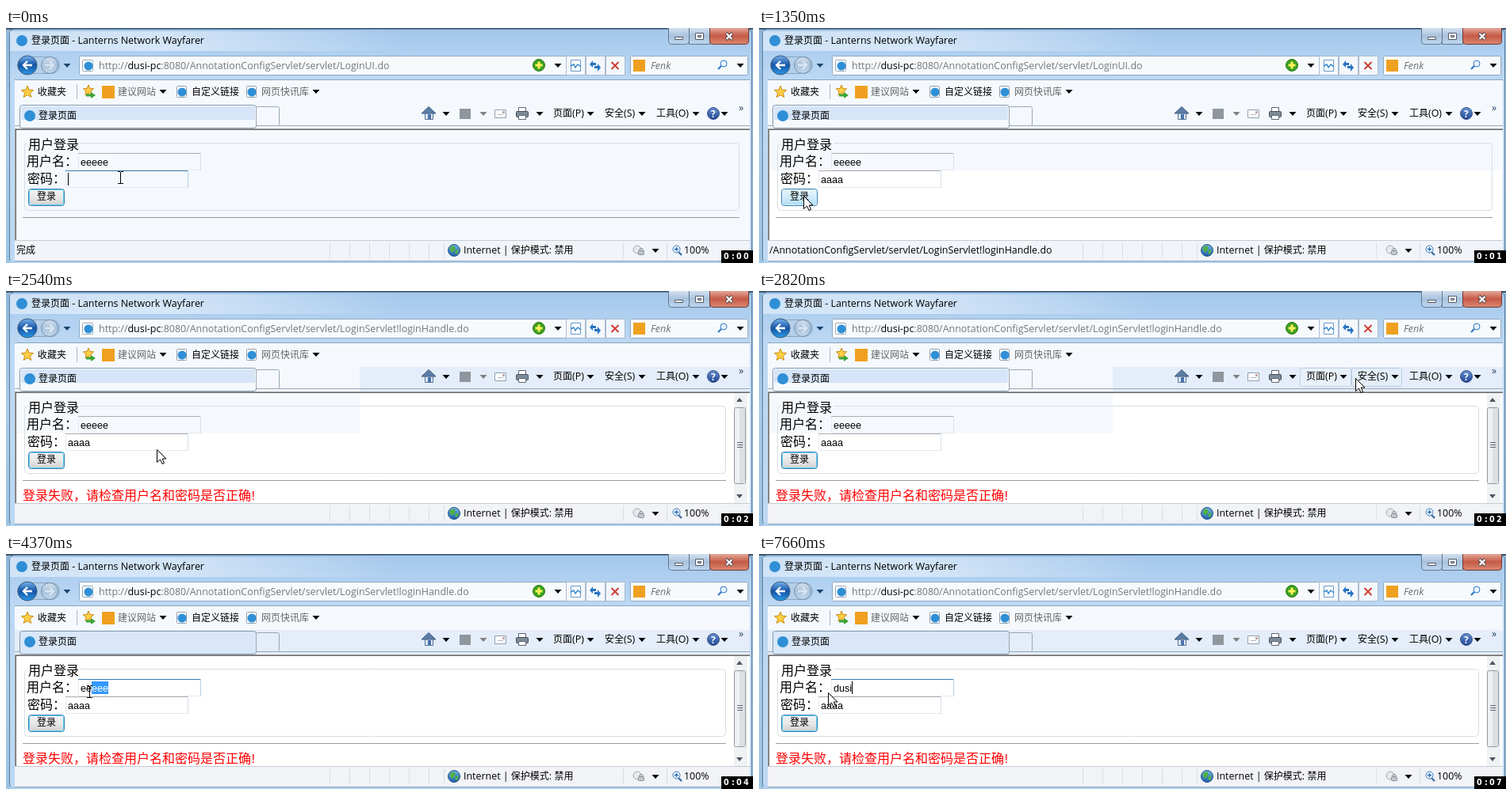
Recreate the animation shown at these times as an HTML page with a canvas. Size 942 by 297 pixels, loop 8000 ms.

```html
<!DOCTYPE html>
<html lang="zh">
<head>
<meta charset="utf-8">
<title>登录页面</title>
<style>
html, body { margin: 0; width: 100%; height: 100%; overflow: hidden; }
canvas { display: block; width: 942px; height: 297px; }
</style>
</head>
<body>
<canvas id="stage" width="942" height="297"></canvas>
<script>
const g = document.getElementById('stage').getContext('2d');
const LOOP = 8000;
const UI = '"Open Sans", "Noto Sans CJK SC", "Noto Sans CJK", sans-serif';
const CJK = '"Noto Sans CJK SC", "Noto Sans CJK", sans-serif';
const FIELD = '12.6px "Liberation Sans", sans-serif';
const TINT = '#f5f9fd';

// Step tracks: [start time, value...]
const pointer = [
  [0, 144, 189, 'beam'], [120, 0, 0, ''], [830, 128, 194, 'beam'], [960, 82, 204, 'beam'],
  [1080, 59, 210, 'arrow'], [1330, 56, 212, 'arrow'], [1480, 54, 213, 'arrow'],
  [2420, 190, 200, 'arrow'], [2550, 420, 160, 'arrow'], [2680, 690, 114, 'arrow'],
  [2820, 752, 110, 'arrow'], [2960, 735, 112, 'arrow'], [3080, 600, 118, 'arrow'],
  [3200, 390, 126, 'arrow'], [3330, 215, 130, 'arrow'], [3450, 140, 140, 'arrow'],
  [3580, 118, 157, 'arrow'], [3730, 134, 168, 'beam'], [3980, 129, 170, 'beam'],
  [4110, 118, 172, 'beam'], [4240, 105, 174, 'beam'], [4380, 92, 175, 'beam'],
  [4510, 82, 175, 'beam'], [4670, 87, 175, 'arrow']
];
const userName = [[0, 'eeeee'], [5350, 'd'], [5590, 'ds'], [6240, 'dsi'],
  [6670, 'd'], [6800, 'du'], [6960, 'dus'], [7660, 'dusi']];
const secret = [[0, ''], [120, 'a'], [270, 'aa'], [410, 'aaa'], [560, 'aaaa']];
const progress = [[0, 0], [1480, .1], [1630, .3], [1780, .56], [1930, .8], [2040, 1], [2150, 0]];
const selected = [[0, 0], [3980, 1], [4110, 2], [4240, 3], [4380, 5], [5350, 0]];
const seconds = [[0, 0], [1080, 1], [2040, 2], [3080, 3], [4110, 4], [5070, 5], [6140, 6], [7130, 7]];
const status = [[0, '完成'], [1080, '/AnnotationConfigServlet/servlet/LoginServlet!loginHandle.do'],
  [1480, '完成'], [2420, '']];

const at = (track, t) => track.reduce((cur, k) => (t >= k[0] ? k : cur));
const within = (t, a, b) => t >= a && t < b;

function rect(x, y, w, h, fill) { g.fillStyle = fill; g.fillRect(x, y, w, h); }
function vgrad(y0, y1, ...cols) {
  const gr = g.createLinearGradient(0, y0, 0, y1);
  cols.forEach((c, i) => gr.addColorStop(i / (cols.length - 1), c));
  return gr;
}
function box(x, y, w, h, r, fill, stroke) {
  g.beginPath();
  g.roundRect(x + .5, y + .5, w - 1, h - 1, r);
  if (fill) { g.fillStyle = fill; g.fill(); }
  if (stroke) { g.strokeStyle = stroke; g.lineWidth = 1; g.stroke(); }
}
function disc(x, y, r, fill, stroke) {
  g.beginPath();
  g.arc(x, y, r, 0, 7);
  g.fillStyle = fill; g.fill();
  if (stroke) { g.strokeStyle = stroke; g.lineWidth = 1; g.stroke(); }
}
function poly(pts, fill, stroke) {
  g.beginPath();
  pts.forEach(([x, y]) => g.lineTo(x, y));
  g.closePath();
  if (fill) { g.fillStyle = fill; g.fill(); }
  if (stroke) { g.strokeStyle = stroke; g.lineWidth = 1; g.stroke(); }
}
function line(pts, color, w = 1) {
  g.beginPath();
  pts.forEach(([x, y]) => g.lineTo(x, y));
  g.strokeStyle = color; g.lineWidth = w; g.stroke();
}
function put(s, x, y, font, color) { g.font = font; g.fillStyle = color; g.fillText(s, x, y); }

// Interface text: Han characters at 12px, Latin slightly larger
function label(s, x, y, color = '#000', style = '') {
  for (const run of s.match(/[\u2e80-\uffff]+|[^\u2e80-\uffff]+/g) || []) {
    const han = run.charCodeAt(0) > 0x2e7f;
    put(run, x, y, `${style} ${han ? 12 : 12.45}px ${han ? CJK : UI}`, color);
    x += g.measureText(run).width;
  }
  return x;
}
const page = (s, x, y, color = '#000') => put(s, x, y, `300 16px ${CJK}`, color);
const drop = (x, y, c = '#000') => poly([[x - 4.5, y - 2], [x + 4.5, y - 2], [x, y + 3]], c);
const badge = (x, y, r = 7) => disc(x, y, r, '#2f8fd6');

function star(x, y, r) {
  const pts = [];
  for (let i = 0; i < 10; i++) {
    const a = i * Math.PI / 5 - Math.PI / 2, q = i % 2 ? r * .45 : r;
    pts.push([x + q * Math.cos(a), y + q * Math.sin(a)]);
  }
  poly(pts, '#ffcf45', '#c98a14');
}
function plus(x, y, r, w, color) {
  line([[x - r, y], [x + r, y]], color, w);
  line([[x, y - r], [x, y + r]], color, w);
}
function cross(x, y, r, w, color) {
  line([[x - r, y - r], [x + r, y + r]], color, w);
  line([[x - r, y + r], [x + r, y - r]], color, w);
}
function lens(x, y, color) {
  line([[x - 2, y + 2], [x - 6, y + 6]], color, 2.2);
  disc(x + 1, y - 1, 4, '#eaf5ff', color);
}

function titleBar() {
  rect(0, 0, 942, 297, vgrad(0, 297, '#8fb6d8', '#a8cbe8', '#9cc3e2'));
  rect(0, 0, 942, 2, '#3f566c');
  box(4, 1, 937, 296, 6, vgrad(0, 66, '#a3c6ea', '#b0d0f0', '#bdd8f3'), '#5b7c9b');
  const glow = g.createLinearGradient(5, 0, 500, 0);
  glow.addColorStop(0, 'rgba(240,247,254,.55)');
  glow.addColorStop(.4, 'rgba(240,247,254,.6)');
  glow.addColorStop(1, 'rgba(240,247,254,0)');
  rect(5, 4, 495, 25, glow);
  badge(20, 16);
  label('登录页面 - Lanterns Network Wayfarer', 32, 20);

  const glass = vgrad(0, 20, '#d3e1f0', '#a9c2dd', '#bed6ee');
  box(835, -4, 27, 25, 4, glass, '#5f7890');
  box(861, -4, 27, 25, 0, glass, '#5f7890');
  box(887, -4, 50, 25, 4, vgrad(0, 20, '#e3a79a', '#c65a45', '#d98670'), '#6b3a38');
  box(843, 11, 11, 4, 0, '#fff', '#535b66');
  box(869, 6, 11, 9, 0, '#fff', '#535b66');
  box(872, 9, 5, 3, 0, '#a9bfd5', '#535b66');
  cross(912, 10.5, 4, 4, '#53474c');
  cross(912, 10.5, 3.5, 2.3, '#fff');
}

function arrowButton(x, r, dir, fill, rim, ink) {
  disc(x, 47, r, fill, rim);
  line([[x - 6 * dir, 47], [x + 4 * dir, 47]], ink, 2.6);
  line([[x, 42], [x + 5 * dir, 47], [x, 52]], ink, 2.4);
}

function addressRow(t) {
  box(14, 36, 54, 22, 11, '#b4cfe9', '#86a5c3');
  arrowButton(27, 12, -1, vgrad(35, 59, '#78b2ea', '#1453a8', '#2c9be4'), '#35587d', '#fff');
  arrowButton(55, 10.5, 1, vgrad(36, 58, '#d5e3f1', '#a9c1da', '#c3d9ee'), '#7690ab', '#d9e6f2');
  drop(77, 47, '#1b466f');

  box(92, 35, 689, 25, 1, '#f7fafd', '#8fa9c2');
  box(96, 40, 14, 15, 1, '#fff', '#9aa9b8');
  badge(104, 48, 5.5);
  let x = label('http://', 117, 52, '#777');
  x = label('dusi-pc', x, 52);
  const file = t < 1480 ? 'LoginUI.do' : 'LoginServlet!loginHandle.do';
  label(':8080/AnnotationConfigServlet/servlet/' + file, x, 52, '#777');

  disc(672, 47, 7.5, '#3da11f', '#2c7a18');
  plus(672, 47, 4.5, 3, '#fff25a');
  drop(696, 47);
  [706, 731, 756].forEach(bx => box(bx, 35, 25, 25, 0, '#f4f8fc', '#a9bccf'));
  box(712, 40, 13, 15, 0, '#fff', '#6d9ac7');
  line([[712, 48], [716, 46], [718, 50], [721, 46], [725, 49]], '#2e86ce', 1.4);
  poly([[736, 46], [740, 41], [740, 44], [744, 44], [744, 47], [740, 47], [740, 50]], '#2774c4');
  poly([[750, 50], [746, 45], [746, 48], [742, 48], [742, 51], [746, 51], [746, 55]], '#2774c4');
  cross(768, 47.5, 4.5, 2, '#cf3d35');

  box(787, 35, 149, 25, 1, '#f7fafd', '#8fa9c2');
  rect(791, 40, 15, 15, '#f0a020');
  label('Fenk', 813, 52, '#6d6d6d', 'italic');
  lens(904, 46, '#2b75bd');
  drop(926, 47);
}

function favourites() {
  rect(11, 66, 927, 62, TINT);
  rect(11, 65, 927, 1, '#8ba6bf');
  star(27, 81, 8);
  label('收藏夹', 40, 85);
  rect(89, 71, 1, 19, '#a8b7c6');
  star(104, 79, 7);
  line([[101, 85], [108, 85]], '#3aa335', 3);
  poly([[107, 81], [113, 85], [107, 89]], '#3aa335');
  rect(121, 73, 16, 16, '#f0a020');
  label('建议网站', 141, 85, '#666');
  drop(198, 80);
  [[221, '自定义链接', '#000'], [309, '网页快讯库', '#666']].forEach(([x, s, c]) => {
    box(x - 6, 73, 13, 15, 1, '#fff', '#8f9cab');
    badge(x + 1, 81, 5.5);
    label(s, x + 13, 85, c);
  });
  drop(391, 80);
}

function tabRow(t) {
  const blue = '#e4edf9', late = t >= 2960;
  if (t >= 2420) rect(late ? 11 : 446, 96, late ? 927 : 492, 31, blue);
  rect(11, 123, 927, 1, '#97a9bc');
  box(17, 97, 299, 30, 3, late ? '#d9e7f8' : TINT, '#8499af');
  if (!late) rect(19, 99, 295, 17, '#d6e5f7');
  badge(30, 111);
  label('登录页面', 41, 115);
  box(315, 99, 30, 25, 2, late ? blue : TINT, '#9aa7b4');

  if (within(t, 2680, 3080)) {
    box(682, 97, 65, 24, 2, '#e8f1fa', '#c1d3e5');
    box(747, 97, 64, 24, 2, '#e3eef9', '#b6cce2');
  }
  rect(528, 107, 11, 8, '#dfe8f1');
  poly([[524, 108], [533, 99.5], [542, 108]], '#5c7ea6', '#3d5c82');
  line([[528.5, 108], [528.5, 115.5], [538.5, 115.5], [538.5, 108]], '#53739a');
  rect(532, 109, 4, 6, '#4973ac');
  drop(555, 108);
  rect(572, 102, 14, 13, '#8f969d');
  drop(602, 108, '#808080');
  box(616, 103, 15, 11, 0, '#fff', '#8f9fb0');
  line([[620, 109.5], [627, 109.5]], '#aab6c4');
  rect(626, 105, 3, 3, '#c5a7a4');
  box(646, 100, 10, 6, 0, '#fff', '#5d6873');
  box(643, 105, 16, 8, 1, '#7d8a98', '#454f5a');
  box(646, 110, 10, 6, 0, '#fff', '#5d6873');
  drop(673, 108);
  [[690, '页面(P)', 737], [755, '安全(S)', 802], [820, '工具(O)', 870]].forEach(([x, s, arrow]) => {
    label(s, x, 112);
    drop(arrow, 108);
  });
  disc(892, 108, 7.5, vgrad(100, 116, '#6a93d4', '#1d4491'), '#3a5588');
  put('?', 889, 113, `bold 12px ${UI}`, '#fff');
  drop(906, 108);
  label('»', 924, 105, '#24415f');
}

function field(x, y, s, o) {
  box(x, y, 155, 22, 1, o.fill, '#e3e9ef');
  rect(x, y, 155, 1, o.focus ? '#3d7bad' : '#abadb3');
  rect(x + 154, y, 1, 22, o.focus ? '#b5cfe7' : '#d9dfe6');
  const tx = x + 3, ty = y + 16;
  put(s, tx, ty, FIELD, '#000');
  if (o.marked) {
    const from = tx + g.measureText(s.slice(0, s.length - o.marked)).width;
    const tail = s.slice(s.length - o.marked);
    rect(from, y + 3, g.measureText(tail).width, 16, '#3399ff');
    put(tail, from, ty, FIELD, '#fff');
  }
  if (o.caret) rect(Math.round(tx + g.measureText(s).width), y + 3, 1, 16, '#000');
}

function content(t) {
  const failed = t >= 1630, right = failed ? 907 : 924;
  rect(11, 127, 927, 142, '#fff');
  if (t < 830 || within(t, 1630, 2420)) rect(12, 128, 925, 140, TINT);
  else if (t < 1630) rect(12, 128, 925, 52, TINT);
  else if (t < 2960) rect(12, 128, 434, 52, TINT);
  rect(11, 127, 927, 1, '#a0a0a0');
  rect(11, 128, 927, 1, '#696969');
  rect(11, 127, 1, 142, '#a0a0a0');
  rect(12, 128, 1, 140, '#696969');

  const fillTop = t < 2960 ? TINT : '#fff';
  const fillLow = t < 120 || within(t, 1630, 2420) ? TINT : '#fff';
  box(23, 145, right - 22, 86, 4, null, '#d5dfe5');
  rect(26, 144, 68, 4, fillTop);
  page('用户登录', 28, 153);
  page('用户名：', 26, 174);
  page('密码：', 27, 196);

  const blinkOff = within(t, 6140, 6240) || within(t, 7510, 7660);
  const marked = at(selected, t)[1], onUser = t >= 3850, onSecret = t < 1330;
  field(91, 158, at(userName, t)[1],
    { focus: onUser, marked, caret: onUser && !marked && !blinkOff, fill: fillTop });
  field(75, 180, at(secret, t)[1], { focus: onSecret, caret: onSecret, fill: fillLow });

  const hot = within(t, 1080, 2420);
  box(28, 203, 46, 22, 3, hot ? vgrad(203, 225, '#eaf6fd', '#d0ebfa', '#a9daf4')
    : vgrad(203, 225, '#f4f4f4', '#e8e8e8', '#cfcfcf'), '#3c7fb1');
  box(29, 204, 44, 20, 2, null, hot ? '#d6f1fc' : '#5fd0f2');
  label('登录', 39, 217);

  rect(21, 239, right - 20, 1, '#9c9c9c');
  if (failed) {
    page('登录失败，请检查用户名和密码是否正确', 21, 264, '#f00');
    put('!', 307, 264, '16px "Liberation Mono", monospace', '#f00');
    scrollbar();
  }
}

function scrollbar() {
  rect(918, 129, 17, 139, '#f0f1f3');
  poly([[921, 140], [929, 140], [925, 135]], '#4d5560');
  poly([[921, 257], [929, 257], [925, 262]], '#4d5560');
  box(918, 147, 15, 97, 2, '#eef0f3', '#9299a1');
  rect(925, 148, 7, 95, '#dce0e5');
  for (let y = 191; y < 200; y += 3) rect(922, y, 7, 1, '#5e6670');
}

function statusBar(t) {
  rect(11, 268, 927, 26, t < 2420 ? '#f1f5fa' : '#f1f3f6');
  rect(11, 268, 927, 1, '#c4ccd4');
  label(at(status, t)[1], 13, 285);
  [408, 433, 458, 483, 508, 533, 552, 778, 833].forEach(x => rect(x, 271, 1, 20, '#d9dee4'));

  const done = at(progress, t)[1];
  if (done) {
    rect(308, 271, 1, 20, '#d9dee4');
    box(313, 273, 94, 16, 2, vgrad(273, 289, '#f4f4f4', '#cfcfcf', '#e4e4e4'), '#a0a0a0');
    rect(315, 275, 90 * done, 12, vgrad(275, 287, '#b5f2b9', '#19c52f', '#4be05a'));
  }
  disc(565, 281, 7.5, vgrad(273, 289, '#6fb5ea', '#1b5ca8'), '#245787');
  poly([[560, 277], [565, 275], [567, 279], [563, 284], [560, 281]], '#53ae48');
  poly([[567, 281], [571, 280], [569, 286], [566, 285]], '#53ae48');
  label('Internet | 保护模式: 禁用', 577, 285);

  disc(796, 280, 5, '#e6eaee', '#a3abb4');
  box(797, 281, 8, 6, 1, '#c2c7cc', '#868e96');
  g.beginPath();
  g.arc(801, 281, 2.5, Math.PI, 0);
  g.strokeStyle = '#868e96';
  g.stroke();
  drop(819, 281);
  line([[848, 283], [852, 287]], '#3c6da5', 2.4);
  disc(845.5, 279.5, 4.5, '#e8f5ff', '#3c77b8');
  plus(845.5, 279.5, 2.5, 1.4, '#2c69ad');
  label('100%', 855, 285);

  rect(5, 294, 935, 3, '#b0d0f0');
  rect(11, 294, 927, 1, '#8fa6bc');
}

function clock(t) {
  rect(902, 281, 40, 16, '#000');
  const font = 'bold 9.6px "DejaVu Sans", sans-serif';
  [['0', 905], [':', 915], ['0', 921], [String(at(seconds, t)[1]), 930]]
    .forEach(([s, x]) => put(s, x, 292, font, '#fff'));
}

function mouse(t) {
  const [, x, y, kind] = at(pointer, t);
  if (kind === 'beam') {
    line([[x + .5, y - 7], [x + .5, y + 8]], '#000');
    [-7.5, 7.5].forEach(d => {
      line([[x - 3, y + d], [x, y + d]], '#000');
      line([[x + 1, y + d], [x + 4, y + d]], '#000');
    });
  } else if (kind === 'arrow') {
    const shape = [[0, 0], [0, 16], [4, 12.5], [6.5, 18], [9, 17], [6.7, 11.5], [11.5, 11.5]];
    poly(shape.map(([a, b]) => [x + a + .5, y + b + .5]), '#fff', '#000');
  }
}

function draw(t) {
  titleBar();
  addressRow(t);
  favourites();
  tabRow(t);
  content(t);
  statusBar(t);
  mouse(t);
  clock(t);
}

const start = performance.now();
function tick() {
  draw((performance.now() - start) % LOOP);
  requestAnimationFrame(tick);
}
tick();
</script>
</body>
</html>
```
